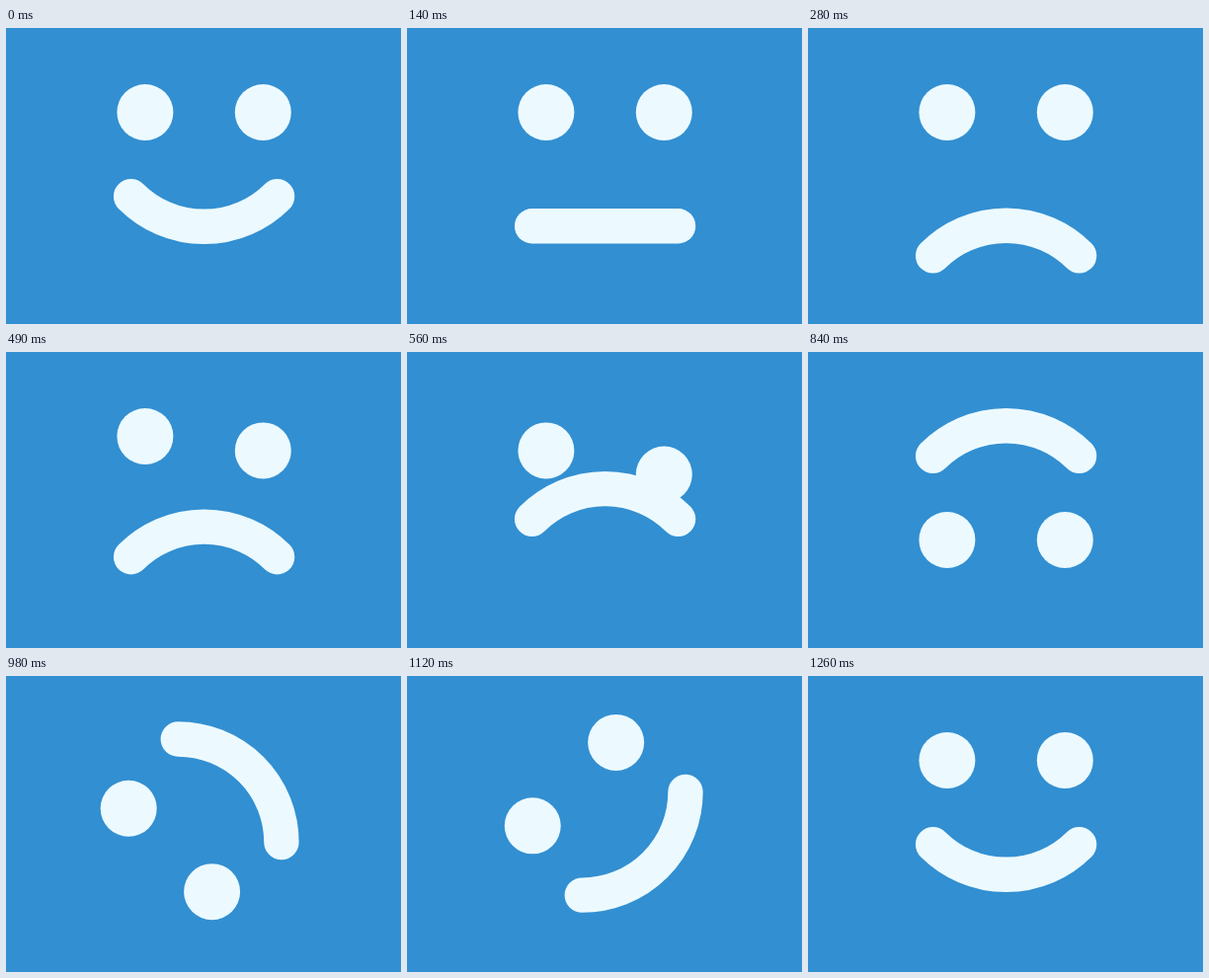
These frames come from a looping animation (400x300 px, 1400 ms). An HTML page with a canvas:

```html
<!DOCTYPE html>
<html lang="en">
<head>
<meta charset="utf-8">
<title>Turning smile</title>
<style>
html, body { margin: 0; width: 100%; height: 100%; overflow: hidden; background: #328fd1; }
canvas { display: block; width: 100vw; height: 100vh; }
</style>
</head>
<body>
<canvas id="stage" width="400" height="300"></canvas>
<script>
const ctx = document.getElementById('stage').getContext('2d');
const LOOP = 1400, STEP = 70, ROLL_START = 840, ROLL_END = 1260;
const BLUE = '#328fd1', PALE = '#ecfaff';
const CX = 200.6, CY = 138;
const EYE_GAP = 59.7, EYE_R = 28.5, EYE_HIGH = 85.5, EYE_LOW = 190.5;
const MOUTH_HALF = 74, MOUTH_W = 35.4;
const SMILE_Y = 201.3, FROWN_Y = 200.2, TOP_Y = 74.7;
const ROLLS = [15, 30, 45, 45, 30]; // degrees turned at each step

const rad = deg => deg * Math.PI / 180;
const lerp = (a, b, k) => a + (b - a) * k;

function progress(t, from, to) {
  return Math.min(1, Math.max(0, (t - from) / (to - from)));
}

// Soft start and end around a steady middle
function ease(k) {
  return lerp((1 - Math.cos(Math.PI * k)) / 2, k, 0.4);
}

function rotate(p, angle) {
  const c = Math.cos(angle), s = Math.sin(angle);
  return { x: p.x * c - p.y * s, y: p.x * s + p.y * c };
}

function eye(x, y) {
  ctx.beginPath();
  ctx.arc(x, y, EYE_R, 0, Math.PI * 2);
  ctx.fill();
}

// Arc through a fixed middle; a positive bend smiles, a negative one frowns
function mouth(midY, bend) {
  const half = Math.abs(bend);
  ctx.beginPath();
  if (half < 0.01) {
    ctx.moveTo(CX - MOUTH_HALF, midY);
    ctx.lineTo(CX + MOUTH_HALF, midY);
  } else {
    const side = Math.sign(bend);
    const r = MOUTH_HALF / Math.sin(half);
    const mid = side * Math.PI / 2;
    ctx.arc(CX, midY - side * r, r, mid - half, mid + half);
  }
  ctx.stroke();
}

// Outline of the upside-down face as discs around its centre
function faceDiscs() {
  const discs = [-1, 1].map(side => ({ x: side * EYE_GAP, y: EYE_LOW - CY, r: EYE_R }));
  const r = MOUTH_HALF / Math.sin(rad(45));
  for (let deg = -135; deg <= -45; deg += 3) {
    discs.push({
      x: r * Math.cos(rad(deg)),
      y: TOP_Y - CY + r + r * Math.sin(rad(deg)),
      r: MOUTH_W / 2
    });
  }
  return discs;
}
const DISCS = faceDiscs();

function boxCentre(angle) {
  const spots = DISCS.map(d => ({ ...rotate(d, angle), r: d.r }));
  const middle = axis =>
    (Math.min(...spots.map(p => p[axis] - p.r)) + Math.max(...spots.map(p => p[axis] + p.r))) / 2;
  return { x: middle('x'), y: middle('y') };
}

// Each step turns the face about the middle of its current bounding box
function rolled(steps) {
  const pose = { x: CX, y: CY, angle: 0 };
  for (const deg of ROLLS.slice(0, steps)) {
    const box = boxCentre(pose.angle);
    const turned = rotate(box, rad(deg));
    pose.x += box.x - turned.x;
    pose.y += box.y - turned.y;
    pose.angle += rad(deg);
  }
  return pose;
}

function draw(time) {
  const t = time < ROLL_END ? time : 0;
  const flip = progress(t, 0, 280);
  const rise = ease(progress(t, 420, 704));
  const dropRight = ease(progress(t, 420, 770));
  const dropLeft = ease(progress(t, 490, 840));
  const pose = rolled(Math.max(0, (t - ROLL_START) / STEP));

  ctx.fillStyle = BLUE;
  ctx.fillRect(0, 0, 400, 300);
  ctx.fillStyle = ctx.strokeStyle = PALE;
  ctx.lineWidth = MOUTH_W;
  ctx.lineCap = 'round';

  ctx.save();
  ctx.translate(pose.x, pose.y);
  ctx.rotate(pose.angle);
  ctx.translate(-CX, -CY);

  eye(CX - EYE_GAP, lerp(EYE_HIGH, EYE_LOW, dropLeft));
  eye(CX + EYE_GAP, lerp(EYE_HIGH, EYE_LOW, dropRight));

  // The smile widens for a moment before it turns down
  const grin = 58 * Math.max(0, Math.sin(2 * Math.PI * flip));
  const bend = 45 * Math.cos(Math.PI * flip) + grin;
  mouth(lerp(lerp(SMILE_Y, FROWN_Y, flip), TOP_Y, rise), rad(bend));
  ctx.restore();
}

const start = performance.now();
function tick() {
  const t = (performance.now() - start) % LOOP;
  draw(Math.floor(t / STEP) * STEP);
  requestAnimationFrame(tick);
}
tick();
</script>
</body>
</html>
```
